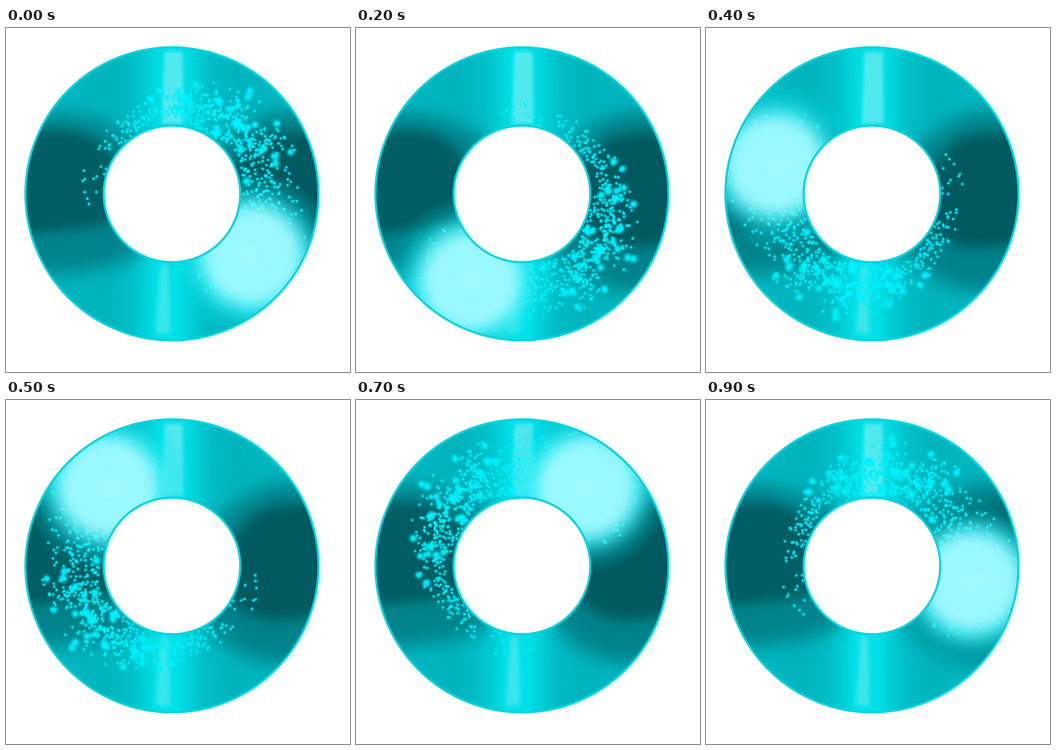
Write an HTML page with a canvas that moves like this. It is 748x748 px and loops after 1000 ms.

```html
<!DOCTYPE html>
<html lang="en">
<head>
<meta charset="utf-8">
<title>Glowing ring</title>
<style>
  html, body { margin: 0; width: 100%; height: 100%; overflow: hidden; background: #fff; }
  canvas { display: block; }
</style>
</head>
<body>
<canvas id="stage" width="748" height="748"></canvas>
<script>
const SIZE = 748, CX = 360.8, CY = 360.7, OUTER = 318.6, INNER = 148.6;
const RAD = Math.PI / 180;

// Rotation in degrees for each 100 ms step
const TURNS = [0, 42, 83, 125, 159, 193.5, 233, 272, 302, 331.7];

function layer() {
  const c = document.createElement('canvas');
  c.width = c.height = SIZE;
  return c.getContext('2d');
}

function seeded(seed) {
  return () => (seed = (seed * 16807) % 2147483647) / 2147483647;
}

function polar(x, y, r, deg) {
  return [x + r * Math.cos(deg * RAD), y + r * Math.sin(deg * RAD)];
}

function radial(g, [x, y], r, rgb, stops) {
  const fill = g.createRadialGradient(x, y, 0, x, y, r);
  for (const [at, alpha] of stops) fill.addColorStop(at, `rgba(${rgb},${alpha})`);
  g.fillStyle = fill;
  g.fillRect(x - r, y - r, 2 * r, 2 * r);
}

// Blurred closed shape, rounded through the midpoints of its corners
function shade(g, color, blur, pts) {
  const n = pts.length;
  const mid = i => [0, 1].map(k => (pts[i % n][k] + pts[(i + 1) % n][k]) / 2);
  g.filter = `blur(${blur}px)`;
  g.fillStyle = color;
  g.beginPath();
  g.moveTo(...mid(0));
  for (let i = 1; i <= n; i++) g.quadraticCurveTo(...pts[i % n], ...mid(i));
  g.fill();
  g.filter = 'none';
}

function streak(g, color, blur, pts) {
  g.filter = `blur(${blur}px)`;
  g.fillStyle = color;
  g.beginPath();
  pts.forEach(p => g.lineTo(...p));
  g.fill();
  g.filter = 'none';
}

// Half of the metal: bright at column x, falling off evenly to both sides
function sheen(g, x, y) {
  const fill = g.createLinearGradient(x - 320, 0, x + 320, 0);
  const falloff = [[0, '#00e2e9'], [26, '#00dfe6'], [52, '#00cfd6'], [85, '#00bdc6'],
    [135, '#00b4bd'], [320, '#00b9c2']];
  for (const [d, color] of falloff) {
    fill.addColorStop(.5 - d / 640, color);
    fill.addColorStop(.5 + d / 640, color);
  }
  g.fillStyle = fill;
  g.fillRect(0, y, SIZE, SIZE / 2);
}

function makeMetal() {
  const g = layer();
  sheen(g, 362, 0);
  sheen(g, 350, CY);

  shade(g, '#00838b', 21, [[-60, 187], [110, 180], [240, 210], [330, 285], [325, 450],
    [270, 510], [120, 538], [-60, 545]]);
  shade(g, '#005e64', 11, [[-120, 232], [60, 224], [155, 220], [235, 268], [250, 360],
    [235, 425], [150, 438], [-120, 458]]);
  shade(g, '#00828a', 20, [[820, 195], [590, 172], [490, 227], [425, 290], [420, 480],
    [490, 545], [580, 580], [820, 570]]);
  shade(g, '#005a60', 13, [[860, 232], [565, 222], [515, 275], [470, 330],
    [470, 425], [530, 470], [590, 482], [860, 445]]);

  streak(g, '#50e9ee', 3.5, [[344, 52], [384, 52], [386, 208], [339, 208]]);
  streak(g, 'rgba(75,232,237,.75)', 5, [[336, 515], [353, 515], [357, 664], [325, 664]]);
  return g.canvas;
}

function makeComet() {
  const g = layer(), rand = seeded(4711);
  const head = polar(CX, CY, 220, 37.5);
  const dot = (at, r) => radial(g, at, r, '0,240,252', [[0, 1], [.36, .9], [.62, .38], [1, 0]]);
  const small = at => dot(at, 4.5 + rand() * .7);
  // Width of the swarm, widening from tail to head
  const reach = deg => 148 + Math.min(0, deg + 40) * 1.2;

  radial(g, head, 185, '0,226,234', [[0, .8], [.6, .7], [.78, .32], [1, 0]]);

  for (let i = 0; i < 500; i++) {
    const a = -45 + (rand() + rand() + rand() - 1.5) * 74;
    small(polar(CX, CY, 152 + reach(a) * ((rand() + rand()) / 2) ** 1.3, a));
  }
  for (let i = 0; i < 32; i++) small(polar(CX, CY, 153 + 45 * rand(), -115 - 73 * rand()));
  for (let i = 0; i < 65; i++) small(polar(...head, 90 + 40 * rand(), 360 * rand()));
  for (let i = 0; i < 28; i++) {
    const a = -48 + (rand() + rand() - 1) * 62;
    dot(polar(CX, CY, 160 + reach(a) * rand(), a), 11 + 3 * rand());
  }

  radial(g, head, 160, '156,249,255', [[0, 1], [.48, .98], [.56, .9], [.63, .72], [.72, .43],
    [.81, .2], [.9, .07], [1, 0]]);
  return g.canvas;
}

const ctx = document.getElementById('stage').getContext('2d');
const metal = makeMetal(), comet = makeComet();

function ring() {
  ctx.beginPath();
  for (const r of [OUTER, INNER]) {
    ctx.moveTo(CX + r, CY);
    ctx.arc(CX, CY, r, 0, 2 * Math.PI);
  }
}

function draw(now) {
  const step = Math.floor(now % 1000 / 100);
  ctx.fillStyle = '#fff';
  ctx.fillRect(0, 0, SIZE, SIZE);

  ctx.save();
  ring();
  ctx.clip('evenodd');
  ctx.drawImage(metal, 0, 0);
  ctx.translate(CX, CY);
  ctx.rotate(TURNS[step] * RAD);
  ctx.drawImage(comet, -CX, -CY);
  ctx.restore();

  ring();
  ctx.strokeStyle = '#00d5e0';
  ctx.lineWidth = 4.6;
  ctx.stroke();
}

const start = performance.now();
function tick() {
  draw(performance.now() - start);
  requestAnimationFrame(tick);
}
tick();
</script>
</body>
</html>
```
